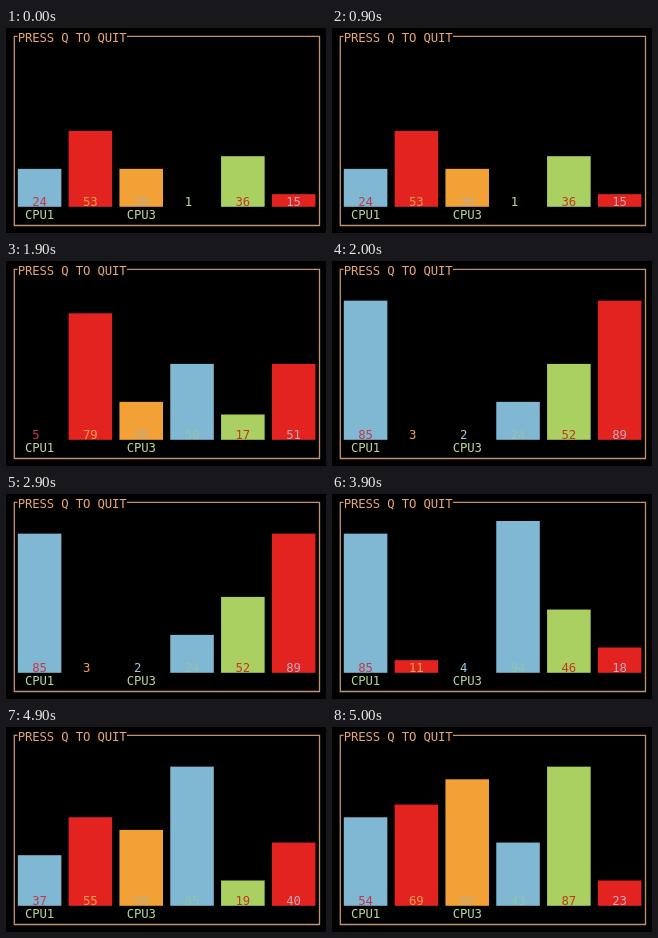
Write an HTML page with a canvas that moves like this. It is 320 by 205 pixels and loops after 5100 ms.

```html
<!DOCTYPE html>
<html lang="en">
<head>
<meta charset="utf-8">
<title>CPU bars</title>
<style>
  html, body { margin: 0; width: 100%; height: 100%; overflow: hidden; background: #000; }
  canvas { display: block; }
</style>
</head>
<body>
<canvas id="stage" width="320" height="205"></canvas>
<script>
const ctx = document.getElementById('stage').getContext('2d');

const LOOP = 5100, STEP = 1000;
const CELL_W = 7.26, CELL_H = 12.65;
const LEFT = 11.8, BASE = 178.8;
const BAR_CELLS = 6, MAX_ROWS = 13;

const RED = '#e3231f', ORANGE = '#f1a136', BLUE = '#80b7d2', GREEN = '#abd062';
const FRAME = '#c3946c', TITLE = '#e6a574', LABEL = '#b9d596';

const bars = [
  { fill: BLUE, ink: '#c03a4c', label: 'CPU1' },
  { fill: RED, ink: '#f0a050' },
  { fill: ORANGE, ink: '#bdab8c', bare: '#9fc4dc', label: 'CPU3' },
  { fill: BLUE, ink: '#92c3ae', bare: '#bcd99a' },
  { fill: GREEN, ink: '#c23a24' },
  { fill: RED, ink: '#bfaab8' }
];

const samples = [
  [24, 53, 30, 1, 36, 15],
  [5, 79, 30, 50, 17, 51],
  [85, 3, 2, 24, 52, 89],
  [85, 11, 4, 94, 46, 18],
  [37, 55, 50, 85, 19, 40],
  [54, 69, 82, 43, 87, 23]
];

// Writes text on the terminal grid, one character per cell.
function write(text, x, y, color) {
  ctx.fillStyle = color;
  [...text].forEach((ch, i) => ctx.fillText(ch, x + (i + 0.5) * CELL_W, y));
}

function drawFrame() {
  ctx.strokeStyle = FRAME;
  ctx.lineWidth = 1.3;
  ctx.beginPath();
  ctx.moveTo(11.5, 8.3);
  ctx.lineTo(8.3, 8.3);
  ctx.lineTo(8.3, 197.5);
  ctx.lineTo(313.5, 197.5);
  ctx.lineTo(313.5, 8.3);
  ctx.lineTo(121, 8.3);
  ctx.stroke();
  write('PRESS Q TO QUIT', LEFT, 13.6, TITLE);
}

function drawBar(bar, i, value) {
  const x = LEFT + i * (BAR_CELLS + 1) * CELL_W;
  const rows = Math.floor(value * MAX_ROWS / 100);
  const height = rows * CELL_H;
  ctx.fillStyle = bar.fill;
  ctx.fillRect(x, BASE - height, BAR_CELLS * CELL_W, height);

  const text = String(value);
  const pad = Math.floor((BAR_CELLS - text.length) / 2);
  write(text, x + pad * CELL_W, 178, rows ? bar.ink : bar.bare || bar.ink);
  if (bar.label) write(bar.label, x + CELL_W, 190.6, LABEL);
}

function draw(now) {
  const values = samples[Math.floor((now % LOOP) / STEP)];
  ctx.fillStyle = '#000';
  ctx.fillRect(0, 0, 320, 205);
  ctx.font = '12.3px "DejaVu Sans Mono", monospace';
  ctx.textAlign = 'center';
  drawFrame();
  bars.forEach((bar, i) => drawBar(bar, i, values[i]));
}

const start = performance.now();
function tick() {
  draw(performance.now() - start);
  requestAnimationFrame(tick);
}
tick();
</script>
</body>
</html>
```
